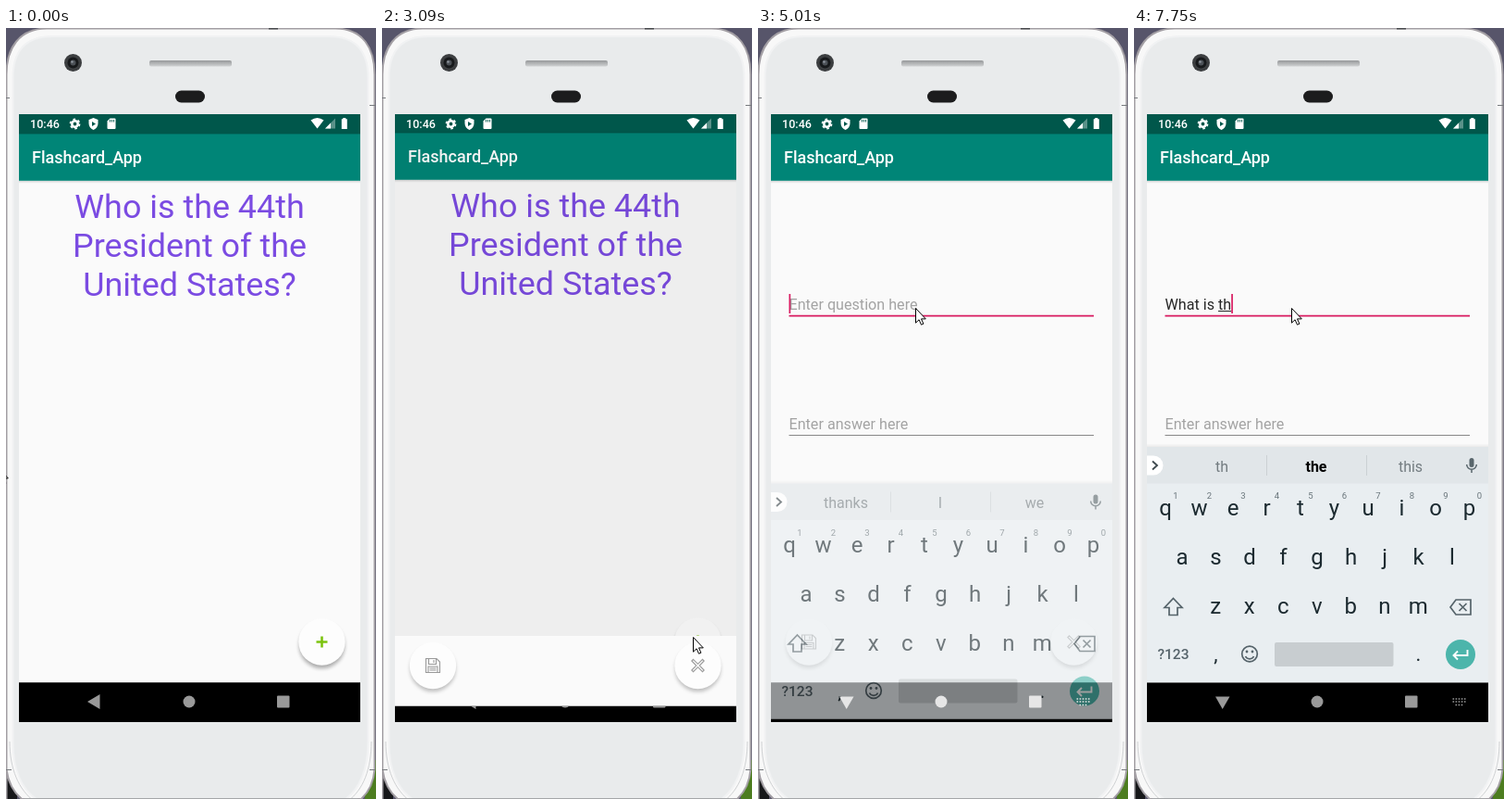
These frames come from a looping animation (400x832 px, 8000 ms). An HTML page:

```html
<!DOCTYPE html>
<html lang="en">
<head>
<meta charset="utf-8">
<title>Flashcard app</title>
<style>
html,body{margin:0;width:100%;height:100%;overflow:hidden;background:#57556a}
svg{display:block;width:400px;height:832px}
text{font-family:Roboto,sans-serif;white-space:pre}
.mid{text-anchor:middle}
.line{fill:none;stroke-linecap:butt}
</style>
</head>
<body>
<svg viewBox="0 0 400 832" xmlns="http://www.w3.org/2000/svg">
<defs>
  <clipPath id="screen"><rect x="14" y="93" width="369" height="656"/></clipPath>
  <clipPath id="reveal"><rect id="revealBox" x="14" y="93" width="369" height="656"/></clipPath>
  <clipPath id="navClip"><rect id="navBox" x="14" y="706" width="369" height="43"/></clipPath>
  <linearGradient id="shade" x1="0" y1="0" x2="0" y2="1">
    <stop offset="0" stop-color="#000" stop-opacity=".15"/><stop offset="1" stop-color="#000" stop-opacity="0"/>
  </linearGradient>
  <linearGradient id="grille" x1="0" y1="0" x2="0" y2="1">
    <stop offset="0" stop-color="#96989a"/><stop offset="1" stop-color="#d0d2d3"/>
  </linearGradient>
  <filter id="blur" x="-40%" y="-40%" width="180%" height="180%"><feGaussianBlur stdDeviation="2.2"/></filter>
  <g id="fab">
    <circle cy="3.5" r="24.5" opacity=".25" filter="url(#blur)"/>
    <circle r="25.2" fill="#fdfdfd"/>
  </g>
  <g id="bar">
    <rect x="14" y="164" width="369" height="542.25" fill="#fafafa"/>
    <rect x="14" y="164.8" width="369" height="3" fill="url(#shade)"/>
    <rect x="14" y="114.4" width="369" height="50.4" fill="#008577"/>
    <text x="28" y="146" font-size="18" font-weight="500" fill="#fff">Flashcard_App</text>
  </g>
</defs>

<!-- phone body -->
<rect width="400" height="832" fill="#57556a"/>
<rect x="388" y="790" width="12" height="42" fill="#4d7d20"/>
<rect y="790" width="12" height="42" fill="#17181a"/>
<rect x="284" y="0" width="10" height="3" fill="#25272b"/>
<path d="M.5 832V50C.5 22 14 .5 44 .5H356C386 .5 398.500 22 398.500 50V800Q397 820 384 832H17Q3 820 .5 800Z" fill="#f8f8f8" stroke="#a39fa4" stroke-width="2"/>
<path d="M7.500 770V54C7.500 24 22 9 50 9H349C377 9 391.500 24 391.500 54V770C391.500 800 382 822 366 833H34C17 822 7.500 800 7.500 770Z" fill="#e9ebec" stroke="#f1f2f3" stroke-width="2"/>
<path d="M4 770C4 800 14 822 30 834M395 770C395 800 386 822 370 834" class="line" stroke="#cfd1d3"/>
<path d="M0 75.500H4M393 83.500H400M0 800.500H6M393 800.500H399" class="line" stroke="#777a7e"/>
<path d="M284 .5H294" class="line" stroke="#4b4d50" stroke-width="2"/>
<path d="M20 831.500H380" class="line" stroke="#a4a6a8"/>
<circle cx="72.500" cy="37.500" r="9.500" fill="#3c3e40"/>
<circle cx="72.500" cy="37.500" r="6" fill="#17191b"/>
<circle cx="72.500" cy="37.500" r="3" fill="#4c5157"/>
<circle cx="71.500" cy="36.500" r="1.300" fill="#8b929a"/>
<rect x="155" y="35" width="89" height="6.500" rx="2" fill="url(#grille)"/>
<rect x="183" y="67.500" width="32" height="13" rx="6.500" fill="#1c1c1d"/>

<g clip-path="url(#screen)">
  <rect x="14" y="93" width="369" height="656"/>
  <rect x="14" y="93" width="369" height="22" fill="#00574b"/>

  <g id="home">
    <use href="#bar"/>
    <g class="mid" font-size="35.9" fill="#7b4be2">
      <text x="198.500" y="205">Who is the 44th</text>
      <text x="198.500" y="247">President of the</text>
      <text x="198.500" y="289">United States?</text>
    </g>
    <g transform="translate(341.500 662.500)">
      <circle id="lift" r="24.500" filter="url(#blur)"/>
      <use href="#fab"/>
      <circle id="ripple" r="25"/>
      <path d="M-6 0H6M0-6V6" class="line" stroke="#7cc30f" stroke-width="2.600"/>
    </g>
    <rect id="dim" x="14" y="113" width="369" height="593.25" opacity=".047"/>
  </g>

  <g id="formClip" clip-path="url(#reveal)">
    <g id="form">
      <use href="#bar"/>
      <g font-size="16.150">
        <text id="hint" x="33.500" y="304" fill="#a3a3a3">Enter question here</text>
        <text x="33.500" y="433" fill="#a3a3a3">Enter answer here</text>
        <text id="typed" x="33.500" y="304" fill="#262626"></text>
      </g>
      <path id="under" class="line" stroke="#262626"/>
      <path d="M33.500 439.500H363" class="line" stroke="#878787"/>
      <path id="rule" class="line"/>
      <rect id="caret" y="287" width="1.700" height="21" fill="#d81b60"/>
      <use href="#fab" x="55" y="662.500"/>
      <use href="#fab" x="341.500" y="662.500"/>
      <g class="line" stroke="#999" stroke-width="1.100">
        <path d="M47.500 655H59L62.500 658.500V670H47.500ZM50.500 655V661H58.500V655M56 656.500V659.500M50 670V663.500H60V670M51.500 665.500H58.500M51.500 667.500H58.500"/>
        <path d="M336.500 655.800L341.500 660.800 346.500 655.800 348.200 657.500 343.200 662.500 348.200 667.500 346.500 669.200 341.500 664.200 336.500 669.200 334.800 667.500 339.800 662.500 334.800 657.500Z"/>
      </g>
    </g>
  </g>

  <g id="board">
    <rect x="14" y="448.500" width="369" height="4" fill="url(#shade)" transform="matrix(1 0 0 -1 0 901)" opacity=".5"/>
    <rect x="14" y="452" width="369" height="254.25" fill="#e9eef1"/>
    <rect x="14" y="452" width="369" height="39.500" fill="#e1e6e9"/>
    <path d="M14 461.500H21A10.500 10.500 0 0 1 21 482.500H14Z" fill="#fff"/>
    <path d="M20 467.500L25 472 20 476.500" class="line" stroke="#3c474c" stroke-width="1.800"/>
    <path d="M143.500 461V483M251.500 461V483" class="line" stroke="#cbd1d4"/>
    <g class="mid" font-size="16">
      <text id="s0" x="95" y="478.500" fill="#737c80"></text>
      <text id="s1" x="197" y="478.500"></text>
      <text id="s2" x="299" y="478.500" fill="#737c80"></text>
    </g>
    <rect x="362.500" y="464" width="5" height="10" rx="2.500" fill="#59666c"/>
    <path d="M359.700 471A5.300 5.300 0 0 0 370.300 471M365 476.500V480" class="line" stroke="#59666c" stroke-width="1.500"/>
    <g id="keys" class="mid" fill="#1c2a30"></g>
    <g class="line" stroke="#55636a" stroke-width="1.700">
      <path d="M42.500 615.500L52 625.500H47V633.500H38V625.500H33Z"/>
      <path d="M348 617H364V633H348L342 625ZM351.500 621L359.500 629M359.500 621L351.500 629"/>
      <circle cx="125" cy="675.500" r="8.300"/>
      <path d="M120.500 678A5 5 0 0 0 129.500 678"/>
    </g>
    <circle cx="122" cy="673" r="1.400" fill="#55636a"/><circle cx="128" cy="673" r="1.400" fill="#55636a"/>
    <text x="42.500" y="681" class="mid" font-size="15.500" font-weight="500" fill="#55636a">?123</text>
    <rect x="152" y="663" width="128.500" height="26" rx="2" fill="#c8cdd0"/>
    <circle cx="353" cy="676" r="16" fill="#4cb5ab"/>
    <path d="M360.500 671V677H346M350 672.500L345.500 677 350 681.500" class="line" stroke="#fff" stroke-width="1.900"/>
  </g>

  <g id="nav" clip-path="url(#navClip)">
    <path id="back"/>
    <circle cx="198" cy="727" r="6.500"/>
    <rect x="293" y="720.500" width="13.500" height="13" rx="1"/>
    <path id="imeIcon" d="M344.500 724H358.500M344.500 727H358.500M347.500 730.500H355.500" class="line" stroke-width="1.600" stroke-dasharray="1.600 1.500"/>
  </g>

  <!-- status icons -->
  <g fill="#fff">
    <text x="26" y="108" font-size="12.600" font-weight="500">10:46</text>
    <circle cx="74.500" cy="103.500" r="3.200" class="line" stroke="#fff" stroke-width="2.600"/>
    <circle cx="74.500" cy="103.500" r="5" class="line" stroke="#fff" stroke-width="1.800" stroke-dasharray="2.600 2.636"/>
    <path d="M94.500 97L99.500 99V103Q99.300 108 94.500 110 89.700 108 89.500 103V99Z"/>
    <path d="M93 101L97 103.500 93 106Z" fill="#00574b"/>
    <path d="M112.500 97.500H117.500Q118.500 97.500 118.500 98.500V108Q118.500 109 117.500 109H110.500Q109.500 109 109.500 108V100.500Z"/>
    <path d="M112.500 99V101.500M114.500 99V101.500M116.500 99V101.500" class="line" stroke="#00574b" stroke-width=".9"/>
    <path d="M329.500 99.500Q336.500 94.500 343.500 99.500L336.500 108.500Z"/>
    <path d="M356 97.500V108.500H345Z" opacity=".35"/>
    <path d="M351 102.500V108.500H345Z"/>
    <path d="M364.300 97H367.300V98.200H368.800V109H362.800V98.200H364.300Z"/>
  </g>
</g>

<path id="mouse" d="M.5.5V16.200L4.100 12.800 6.500 18.200 8.900 17.200 6.500 11.900H11.300Z" fill="#fff" stroke="#000"/>
</svg>
<script>
const $ = id => document.getElementById(id);
const set = (id, attrs) => { for (const k in attrs) $(id).setAttribute(k, attrs[k]); };
const show = (id, on) => set(id, { display: on ? 'inline' : 'none' });

// latest entry whose time has been reached
const at = (steps, t) => steps.reduce((a, s) => s[0] <= t ? s : a);

const LOOP = 8000;
const OFF = -60;
const NAV = 706.25, BOTTOM = 749;
const mouse = [
  [0, -9, 474], [120, OFF, OFF], [940, 382, 708],
  [1090, 370, 694], [1210, 354, 675], [1330, 341, 662], [1450, 336, 657],
  [3770, 236, 476], [3920, 181, 338], [4040, 173, 320], [4190, 171, 305], [4440, 170, 302]
];
// time, home shift, form shift, top of the revealed part
const slide = [
  [0, 0, 0, 749], [3090, -1, 25.5, 656], [3250, -10, 7, 230], [3380, -12, 1, 93], [3500, -12, 0, 93]
];
// time, finished text, underlined word
const typing = [
  [0, '', ''], [5700, '', 'W'], [6110, '', 'Wh'], [6230, '', 'Wha'], [6510, '', 'What'],
  [6650, 'What ', ''], [6770, 'What ', 'i'], [6890, 'What ', 'is'],
  [7050, 'What is ', ''], [7630, 'What is ', 't'], [7750, 'What is ', 'th']
];
const hints = [
  [0, 'thanks', 'I', 'we'], [5830, 'W', 'We', 'What'], [6110, 'Wh', 'What', 'Who'],
  [6230, 'Wha', 'What', 'What\u2019s'], [6510, 'What', 'What', 'Whatever'],
  [6650, 'are', 'is', 'happened'], [6770, 'i', 'is', 'I'], [6890, 'is', 'is', 'issue'],
  [7050, 'a', 'the', 'this'], [7630, 't', 'the', 'this'], [7750, 'th', 'the', 'this']
];

function key(ch, x, y, size) {
  const el = document.createElementNS('http://www.w3.org/2000/svg', 'text');
  el.textContent = ch;
  el.setAttribute('x', x);
  el.setAttribute('y', y);
  el.setAttribute('font-size', size);
  if (size < 12) el.setAttribute('fill', '#68747a');
  $('keys').appendChild(el);
}
const STEP = 36.5;
[['qwertyuiop', 34, 526], ['asdfghjkl', 52, 579], ['zxcvbnm', 88.3, 632]].forEach(([row, x, y]) =>
  [...row].forEach((ch, i) => key(ch, x + i * STEP, y, 24)));
[...'1234567890'].forEach((ch, i) => key(ch, 45 + i * STEP, 508, 9.5));
key(',', 88.5, 683, 22);
key('.', 307.5, 683, 22);

function textWidth(el, s) {
  el.textContent = s;
  return s ? el.getComputedTextLength() : 0;
}

function render(t) {
  const [, mx, my] = at(mouse, t);
  set('mouse', { transform: `translate(${mx} ${my})` });

  const [, homeY, formY, top] = at(slide, t);
  set('home', { transform: `translate(0 ${homeY})` });
  set('form', { transform: `translate(0 ${formY})` });
  set('revealBox', { y: top, height: BOTTOM - top });
  show('home', t < 3380);
  show('formClip', t >= 3090);
  show('dim', t >= 3090);
  set('navBox', { y: NAV + formY, height: BOTTOM - NAV - formY });

  const pressed = t >= 2440 && t < 3090;
  set('lift', { opacity: pressed ? .24 : .1, cy: pressed ? 6 : 4.5 });
  set('ripple', { opacity: !pressed ? 0 : t < 2820 ? .025 : .05 });

  const focus = t >= 4600;
  set('rule', {
    d: focus ? 'M33.500 310.700H363' : 'M33.500 310.500H363',
    stroke: focus ? '#d81b60' : '#878787', 'stroke-width': focus ? 1.8 : 1
  });
  const [, done, word] = at(typing, t);
  const from = 33.5 + textWidth($('typed'), done);
  const end = 33.5 + textWidth($('typed'), done + word);
  set('under', { d: word ? `M${from} 305.500H${end}` : 'M0 0' });
  set('caret', { x: end });
  show('caret', t >= 4730 && t < 5150 || t >= 5700);
  show('hint', t < 5700);

  const ime = t >= 5010, rising = ime && t < 5150;
  show('board', ime);
  set('board', { transform: `translate(0 ${rising ? 39.5 : 0})`, opacity: rising ? .62 : 1 });
  const words = at(hints, t);
  [0, 1, 2].forEach(i => { $('s' + i).textContent = words[i + 1]; });
  const strong = t >= 5830 && (t < 6650 || t >= 6770);
  set('s1', { 'font-weight': strong ? 700 : 400, fill: strong ? '#000' : '#737c80' });

  const tint = rising ? '#e6e6e6' : '#999';
  set('nav', { fill: tint });
  set('imeIcon', { stroke: tint });
  show('imeIcon', ime);
  set('back', { d: ime ? 'M88 721.500H103.500L95.700 735Z' : 'M88 727L101.500 719V735Z' });
}

function tick() {
  render(performance.now() % LOOP);
  requestAnimationFrame(tick);
}
tick();
</script>
</body>
</html>
```
